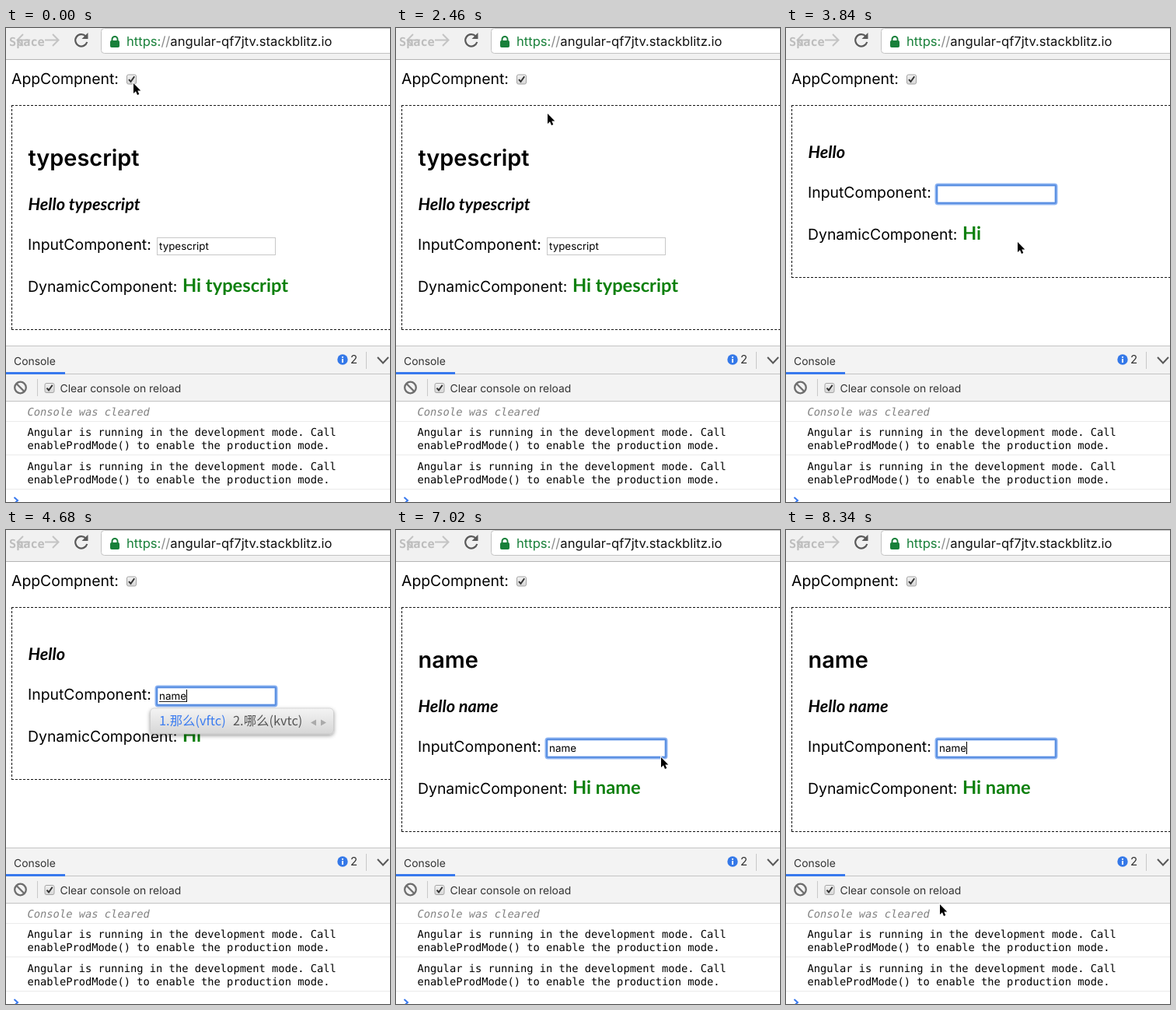
Write an HTML page that moves like this. It is 494x609 px and loops after 8.4 s.

```html
<!DOCTYPE html>
<html lang="en">
<head>
<meta charset="utf-8">
<title>Dynamic component demo</title>
<style>
  html, body { margin: 0; width: 100%; height: 100%; overflow: hidden; background: #fff; }
  svg { display: block; }
  text { font-family: Inter, Roboto, sans-serif; font-optical-sizing: none;
    text-rendering: geometricPrecision; white-space: pre; }
  .label { font-size: 19.4px; }
  .title { font-size: 28.9px; font-weight: 600; }
  .hello { font: italic 700 21.7px Lato, sans-serif; }
  .hi { font: 700 23.7px Lato, sans-serif; fill: #0d800d; }
  .field { font-size: 13.4px; }
  .url { font-size: 16.6px; }
  .ui { font-size: 13.9px; fill: #333; }
  .log { font: 13.76px "DejaVu Sans Mono", monospace; }
  .cleared { font-style: italic; fill: #808080; }
  .ime { font: 16.4px "Noto Sans CJK SC", "Noto Sans CJK", sans-serif; fill: #555; }
  .ghost { font: 700 15.2px "DejaVu Sans Mono", monospace; fill: #bdbdbd; }
  .line { fill: none; stroke-width: 1; }
</style>
</head>
<body>
<svg width="494" height="609" viewBox="0 0 494 609">
  <defs>
    <linearGradient id="box" x2="0" y2="1">
      <stop stop-color="#f4f4f4"/><stop offset="1" stop-color="#d6d6d6"/>
    </linearGradient>
    <filter id="shadow" x="-10%" y="-30%" width="120%" height="180%">
      <feDropShadow dx="0" dy="2" stdDeviation="2.5" flood-opacity=".4"/>
    </filter>
    <rect id="checkbox" x=".5" y=".5" width="12" height="12" rx="2" fill="url(#box)" stroke="#a3a3a3"/>
    <path id="tick" d="M3 6.7L5.5 9.5L10.2 2.8" fill="none" stroke="#333" stroke-width="2"/>
  </defs>

  <!-- browser bar -->
  <path d="M0 0H494V40H0Z" fill="#f1f1f1"/>
  <path class="line" d="M0 40.5H494" stroke="#b4b4b4"/>
  <g fill="none" stroke="#c4c4c4" stroke-width="2">
    <path d="M31 15.5H15M22 8L14.5 15.5L22 23"/>
    <path d="M50 15.5H67M60 8L67.5 15.5L60 23"/>
  </g>
  <text class="ghost" x="4" y="23">Space</text>
  <path d="M102.5 10.5A7.7 7.7 0 1 0 104.3 18" fill="none" stroke="#5a5a5a" stroke-width="2.2"/>
  <path d="M105.5 6V14H97.5Z" fill="#5a5a5a"/>
  <rect x="122.5" y=".5" width="390" height="32" rx="4" fill="#fff" stroke="#c3c3c3"/>
  <g stroke="#18803a">
    <rect x="134.5" y="16.5" width="11" height="8" rx="1" fill="#18803a"/>
    <path d="M136.5 17V14.5A3.5 3.5 0 0 1 143.5 14.5V17" fill="none" stroke-width="2"/>
  </g>
  <text class="url" x="155" y="23" fill="#111"><tspan fill="#18803a">https:</tspan><tspan fill="#888">//</tspan>angular-qf7jtv.stackblitz.io</text>

  <!-- page -->
  <text class="label" x="7" y="72">AppCompnent:</text>
  <use href="#checkbox" x="155" y="59.5"/>
  <use id="checked" href="#tick" x="155" y="59.5"/>
  <path id="frame" class="line" stroke="#111" stroke-dasharray="3 2"/>
  <text id="title" class="title" x="28.5" y="177"></text>
  <text id="hello" class="hello" x="28.5"></text>
  <g id="form">
    <text class="label" x="28" y="285">InputComponent:</text>
    <rect x="194.5" y="269.5" width="152" height="22" fill="#fff" stroke="#c8c8c8"/>
    <g id="focus" fill="none">
      <rect x="193.5" y="268.5" width="154" height="24" rx="2" stroke="#8db4f2" stroke-width="4"/>
      <rect x="194" y="269" width="153" height="23" rx="1" stroke="#4d86dd" stroke-width="1.5"/>
    </g>
    <rect id="selection" x="197" y="272" width="65" height="17" fill="#b3d5fe"/>
    <text id="value" class="field" x="197" y="285"></text>
    <path id="underline" class="line" stroke="#222"/>
    <path id="caret" class="line" stroke="#000"/>
    <text class="label" x="28" y="339">DynamicComponent:</text>
    <text id="hi" class="hi" x="227" y="339"></text>
  </g>
  <g id="popup">
    <rect x="185.5" y="229" width="236" height="33" rx="5" fill="url(#box)" stroke="#c2c2c2" stroke-width=".6" filter="url(#shadow)"/>
    <text class="ime" x="197" y="251" style="fill:#3b7cf0">1.那么(vftc)</text>
    <text class="ime" x="292" y="251">2.哪么(kvtc)</text>
    <path d="M399 243.5V251.5L392 247.5ZM405 243.5V251.5L412 247.5Z" fill="#aaa"/>
  </g>

  <!-- developer console -->
  <path d="M0 408H494V479H0Z" fill="#f3f3f3"/>
  <path class="line" d="M0 408.5H494M0 444.5H494M0 479.5H494" stroke="#c4c4c4"/>
  <path d="M0 442H76V445H0Z" fill="#3879ee"/>
  <text class="ui" x="10" y="433">Console</text>
  <circle cx="433" cy="426" r="6.7" fill="#3478e8"/>
  <path d="M432 422H434V423.8H432ZM432 425H434V430H432Z" fill="#fff"/>
  <text class="ui" x="443" y="431" style="font-size:15px">2</text>
  <path class="line" d="M463.5 416V438M40.5 451V473" stroke="#c8c8c8"/>
  <path d="M478 423L485 430.5L492 423" fill="none" stroke="#5a5a5a" stroke-width="2"/>
  <g fill="none" stroke="#6e6e6e" stroke-width="2.3">
    <circle cx="18.5" cy="462" r="7.3"/><path d="M13.5 457L23.5 467"/>
  </g>
  <use href="#checkbox" x="49.5" y="456"/>
  <use href="#tick" x="49.5" y="456"/>
  <text class="ui" x="69.5" y="468">Clear console on reload</text>
  <path class="line" d="M0 505.5H494M0 548.5H494M0 592.5H494" stroke="#ebebeb"/>
  <text class="log cleared" x="27.5" y="498">Console was cleared</text>
  <g id="logs"></g>
  <path d="M10.5 603L15 607L10.5 611" fill="none" stroke="#3879ee" stroke-width="2"/>

  <path id="arrow" d="M0 0V13L3 10.3L5 15L7.3 14L5.3 9.4H9.3Z" stroke="#fff" stroke-width="1.6" paint-order="stroke"/>
  <path id="beam" d="M-3 -8Q0 -8 0 -6V6Q0 8 -3 8M3 -8Q0 -8 0 -6V6Q0 8 3 8M-2 3H2" fill="none" stroke="#222"/>
</svg>
<script>
const LOOP = 8400, STEP = 60;
const UNCHECK = 1080, RECHECK = 2160, FOCUS = 3060, SELECT = 3240,
  CLEAR = 3720, TYPE = 4200, KEY = 120, COMMIT = 5040, WAKE = 6480;
// pointer stops: time, x, y
const stops = [
  [0, 164, 71], [900, 164, 71], [1080, 163, 68], [2220, 163, 68],
  [2460, 195, 110], [2940, 298, 280], [3660, 298, 280], [3840, 298, 275],
  [WAKE, 298, 275], [6960, 341, 292], [7320, 341, 292], [8040, 198, 481], [LOOP, 198, 481]
];
const $ = id => document.getElementById(id);
const show = (id, on) => $(id).setAttribute('visibility', on ? 'visible' : 'hidden');
const move = (id, x, y) => $(id).setAttribute('transform', `translate(${x} ${y})`);
const put = (id, text) => { if ($(id).textContent !== text) $(id).textContent = text; };

$('logs').innerHTML = [524, 568].map(y =>
  `<text class="log" x="27.5" y="${y}">Angular is running in the development mode. Call</text>
   <text class="log" x="27.5" y="${y + 17}">enableProdMode() to enable the production mode.</text>`).join('');

function pointerAt(t) {
  const i = stops.findIndex(s => s[0] > t);
  const [a, x, y] = stops[i - 1], [b, u, v] = stops[i];
  const p = (t - a) / (b - a), e = p * p * (3 - 2 * p);
  return [x + (u - x) * e, y + (v - y) * e];
}

function draw(t) {
  const checked = t < UNCHECK || t >= RECHECK;
  const name = t < CLEAR ? 'typescript' : t < COMMIT ? '' : 'name';
  const composing = t >= TYPE && t < COMMIT;
  const value = composing ? 'name'.slice(0, 1 + Math.floor((t - TYPE) / KEY)) : name;
  const rise = name ? 0 : 67;
  const shift = rise + (checked ? 0 : 52.5);
  const bottom = Math.round(387 - shift) + .5;

  show('checked', checked);
  $('frame').setAttribute('d', `M7 99.5H500M7.5 99V${bottom}M7 ${bottom}H500`);
  put('title', name);
  put('hello', 'Hello ' + name);
  show('hello', checked);
  $('hello').setAttribute('y', 234 - rise);
  move('form', 0, -Math.round(shift));
  put('value', value);
  put('hi', 'Hi ' + name);

  const selected = t >= SELECT && t < CLEAR;
  show('focus', t >= FOCUS);
  show('selection', selected);
  const end = 197 + (value ? $('value').getComputedTextLength() : 0);
  $('underline').setAttribute('d', `M197 287.5H${end}`);
  show('underline', composing);
  $('caret').setAttribute('d', `M${Math.round(end) + .5} 272V288`);
  const blink = (t + 900) % 1000 < 500;
  show('caret', t >= FOCUS && !selected && (composing || blink));
  show('popup', composing);

  const [x, y] = pointerAt(t);
  const visible = t < TYPE || t >= WAKE;
  const top = 269 - shift;
  const inField = x > 194 && x < 347 && y > top && y < top + 22;
  move('arrow', x, y);
  move('beam', x, y);
  show('arrow', visible && !inField);
  show('beam', visible && inField);
}

const start = performance.now();
function tick() {
  const t = (performance.now() - start) % LOOP;
  draw(Math.floor(t / STEP) * STEP);
  requestAnimationFrame(tick);
}
tick();
</script>
</body>
</html>
```
